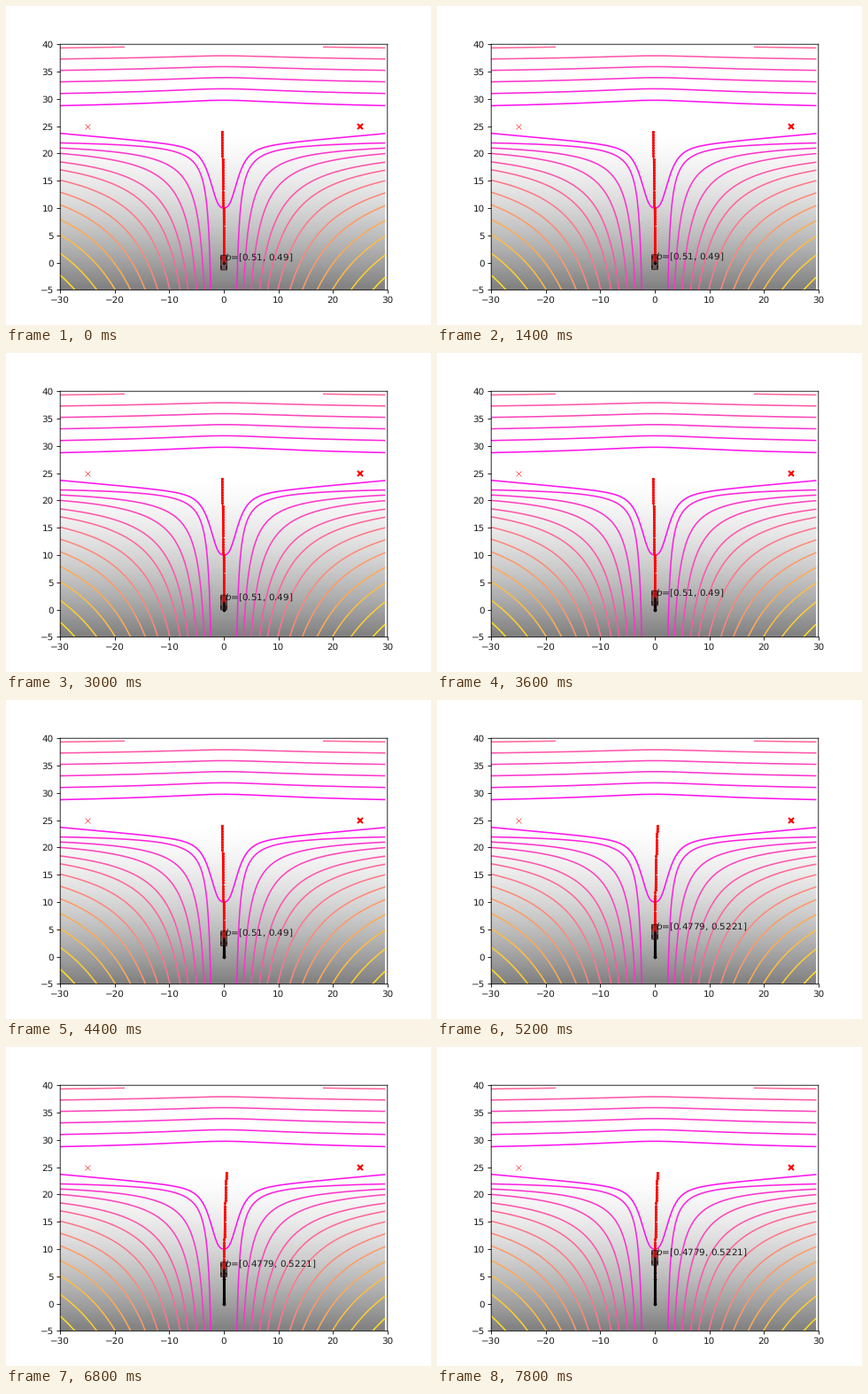
A matplotlib script that plays this animation: 480 by 360 pixels, repeating every 8000 ms.

```python
import numpy as np
import matplotlib.pyplot as plt
from matplotlib.animation import FuncAnimation
from matplotlib.patches import Rectangle

N_FRAMES = 40
REPLAN = 26      # frame at which the belief is updated
HOLD = 5         # frames the car waits at each planning step
GOAL_Y = 25
INK = "#1c1c1c"

plt.rcParams.update({"text.hinting": "none", "text.color": INK,
                     "xtick.labelcolor": INK, "ytick.labelcolor": INK})

fig, ax = plt.subplots(figsize=(6.4, 4.8), dpi=75)

# Darkness grows with the distance below the goals
rows = np.linspace(-5, 39.5, 300)
depth = np.clip(GOAL_Y - rows, 0, None) / 30
ax.imshow((1 - 0.5 * depth ** 1.65)[:, None], cmap="gray", vmin=0, vmax=1,
          extent=(-30, 29.5, -5, 39.5), origin="lower", aspect="equal",
          interpolation="bilinear", zorder=0)
ax.set_xlim(-30, 30)
ax.set_ylim(-5, 40)
ax.set_xticks(range(-30, 31, 10))
ax.set_yticks(range(-5, 41, 5))

# Keep the frame and ticks on their exact sub-pixel places
for spine in ax.spines.values():
    spine.set_snap(False)
for tick in ax.get_xticklines() + ax.get_yticklines():
    tick.set_snap(False)


def contour(x, y, level):
    ax.plot(x, y, color=plt.cm.spring(level / 15), lw=1.5, zorder=2)


def upper_contours():
    x = np.linspace(-30, 29.5, 240)
    ridge = np.log1p((x / 7) ** 2) / np.log1p((30 / 7) ** 2)
    peaks = [29.75, 31.85, 33.9, 35.9, 37.9, 39.88]
    drops = [1.0, 0.87, 0.78, 0.68, 0.6, 0.55]
    for level, (peak, drop) in enumerate(zip(peaks, drops), 1):
        y = peak - drop * ridge
        contour(x, np.where(y <= 39.5, y, np.nan), level)


def pit_contour():
    x = np.linspace(-30, 29.5, 400)
    slope = 1.3 + 0.09 * (30 - abs(x))
    pit = 11 / (1 + (abs(x) / 2.7) ** 2.9)
    contour(x, GOAL_Y - slope - pit, 1)


def side_contours():
    # Each curve leaves the side at depth `side` and the floor at `foot`
    sides = [3.07, 4.0, 5.0, 6.55, 8.0, 9.9, 12.1, 14.4, 17.1, 19.9, 23.3, 27.3]
    feet = [2.4, 3.6] + sides[2:]
    for level, (side, foot) in enumerate(zip(sides, feet), 2):
        p = 0.2 + 0.8 / level

        def q(v):
            return v ** -p - 30 ** -p

        for sign, edge in ((-1, 30), (1, 29.5)):
            x = np.geomspace(edge, foot, 120)
            rest = q(side) * (1 - q(x) / q(foot))
            u = (rest + 30 ** -p) ** (-1 / p)
            contour(sign * x, GOAL_Y - u, level)


upper_contours()
pit_contour()
side_contours()

ax.plot(-25, GOAL_Y, "x", color="red", ms=6, mew=0.5, zorder=3, snap=False)
ax.plot(25, GOAL_Y, "x", color="red", ms=6, mew=2, zorder=3, snap=False)


def car_y(i):
    """Height of the car: speeding up, cruising, then a faster second leg."""
    if i <= REPLAN:
        k = max(0, i - HOLD + 1)
        ramp = min(k, 14)
        return 0.0108 * ramp ** 2 + 0.302 * (k - ramp)
    return car_y(REPLAN) + 0.43 * max(0, i - REPLAN - HOLD + 1)


def plan_path(start, end_x):
    s = np.linspace(0, 1, int((24 - start) / 0.5) + 1)
    return end_x * s ** 1.8, start + (24 - start) * s


plans = [plan_path(0, -0.36), plan_path(car_y(REPLAN), 0.45)]
beliefs = ["$b$=[0.51, 0.49]", "$b$=[0.4779, 0.5221]"]

plan, = ax.plot([], [], "-o", color="red", lw=1.4, ms=3.1, mew=0,
                snap=False, zorder=4)
trail, = ax.plot([], [], "-o", color="black", lw=1.8, ms=3.1, mew=0,
                 snap=False, zorder=5)

# Parts of the car: x, y from its centre, width, height, face, edge
dark = (0.12, 0.04, 0.04, 0.75)
parts = [(-0.55, -1.35, 1.1, 2.7, (0.25, 0.1, 0.1, 0.5), dark),
         (-0.45, 0.0, 0.9, 1.25, (0.9, 0.05, 0.05, 0.45), "none")]
parts += [(x - 0.13, y - 0.3, 0.26, 0.6, dark, "none")
          for x in (-0.5, 0.5) for y in (-0.85, 0.85)]
car = [ax.add_patch(Rectangle((0, 0), w, h, facecolor=face, edgecolor=edge,
                              lw=0.9, snap=False, zorder=6))
       for _, _, w, h, face, edge in parts]
label = ax.text(0, 0, "", fontsize=10, zorder=8)


def draw(i):
    y = car_y(i)
    leg = int(i >= REPLAN)
    plan.set_data(*plans[leg])
    past = [car_y(j) for j in range(i + 1)]
    trail.set_data(np.zeros(i + 1), past)
    for patch, (dx, dy, *_) in zip(car, parts):
        patch.set_xy((dx, y + dy))
    label.set_position((0.2, y + 0.5))
    label.set_text(beliefs[leg])
    return [plan, trail, *car, label]


anim = FuncAnimation(fig, draw, frames=N_FRAMES, interval=200,
                     repeat=True, repeat_delay=0, blit=False)
plt.show()
```
